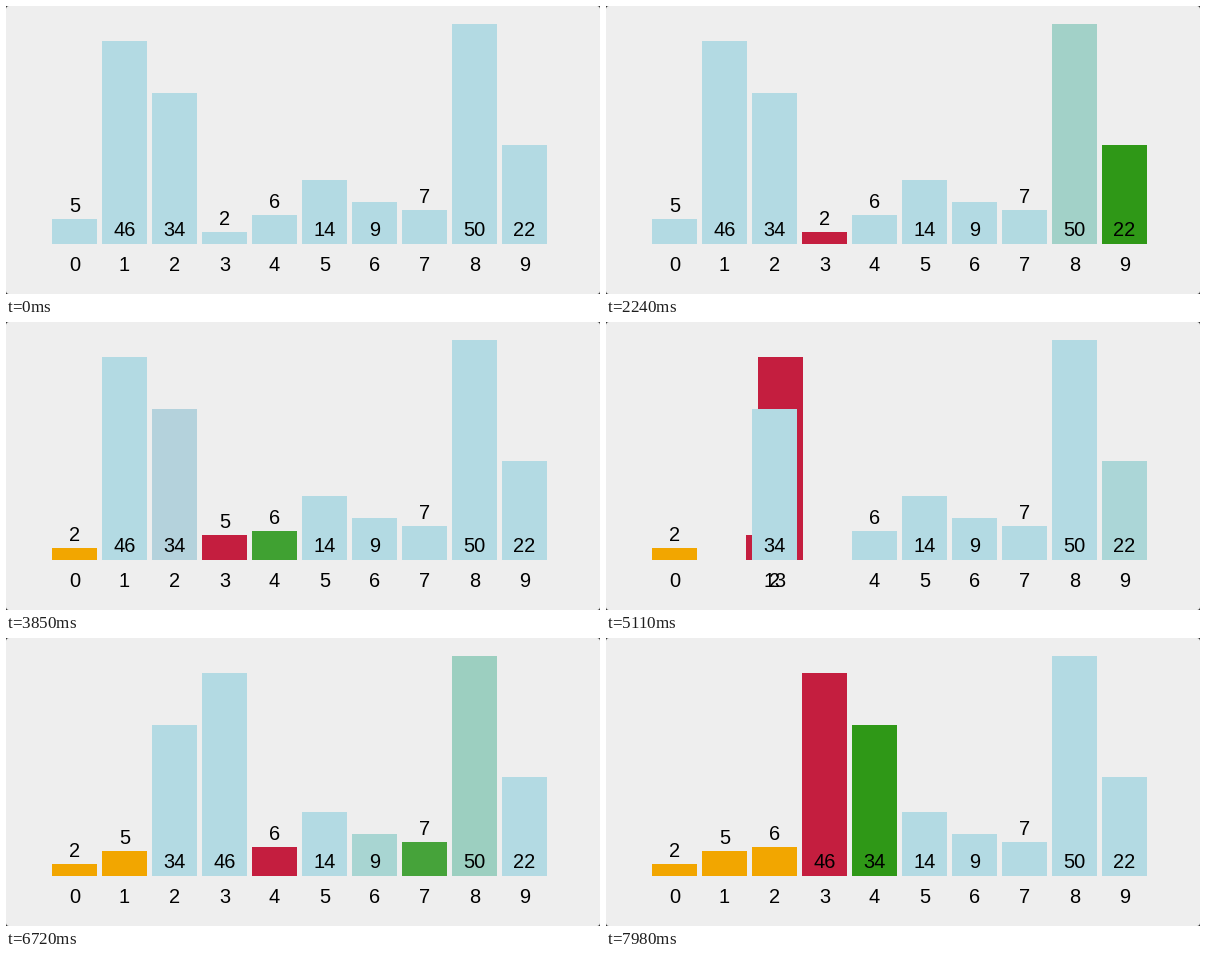
Animation of 594x288 px, one loop 8 s. Source, as a matplotlib script:

```python
import math

import matplotlib.pyplot as plt
import numpy as np
from matplotlib.animation import FuncAnimation
from matplotlib.colors import to_rgb
from matplotlib.patches import FancyBboxPatch, Rectangle

WIDTH, HEIGHT, DPI = 594, 288, 72
LOOP_MS, INTERVAL = 8000, 20
HOLD_MS, TICK_MS = 280, 70

VALUES = [5, 46, 34, 2, 6, 14, 9, 7, 50, 22]
BAR_W, PITCH, LEFT, BASE = 45, 50, 46, 238
BLUE, RED, GREEN, ORANGE = map(to_rgb, ("#b3dae3", "#c41e3f", "#2f9817", "#f2a600"))

# Pace of the sort: milliseconds against steps taken
PACE_MS = [280, 1540, 2940, 3850, 5110, 6720, 7980]
PACE_STEP = [0.45, 7.25, 14.63, 19.68, 26.52, 35.35, 42.05]


def selection_sort(values):
    """Return one (colours, slots) pair per step, both indexed by bar."""
    n = len(values)
    order = list(range(n))
    done, steps = set(), []

    def record(red=(), green=None):
        colours, slots = [BLUE] * n, [0] * n
        for slot, bar in enumerate(order):
            slots[bar] = slot
            if slot in done:
                colours[bar] = ORANGE
            elif slot in red:
                colours[bar] = RED
            elif slot == green:
                colours[bar] = GREEN
        steps.append((colours, slots))

    record()
    for i in range(n):
        low = i
        record(red=[low])
        for j in range(i + 1, n):
            record(red=[low], green=j)
            if values[order[j]] < values[order[low]]:
                low = j
                record(red=[low])
        if low != i:
            record(red=[i, low])
            order[i], order[low] = order[low], order[i]
            record(red=[i, low])
        done.add(i)
        record()
    return steps


STEPS = selection_sort(VALUES)


def ease(u):
    u = min(max(u, 0), 1)
    return 4 * u**3 if u < 0.5 else 1 - 4 * (1 - u) ** 3


def bar_colour(bar, step, phase):
    """Blend from the last colour change; fades to blue leave a faint trail."""
    k = step
    while k > 0 and STEPS[k][0][bar] == STEPS[k - 1][0][bar]:
        k -= 1
    new = STEPS[k][0][bar]
    if k == 0:
        return new
    age = step - k + phase
    rest = 1 - ease(age)
    if new == BLUE:
        rest = max(rest, 0.25 * (1 - age / 2))
    old = STEPS[k - 1][0][bar]
    return tuple(rest * a + (1 - rest) * b for a, b in zip(old, new))


def bar_height(value):
    return (13 * value + 10) / 3


fig = plt.figure(figsize=(WIDTH / DPI, HEIGHT / DPI), dpi=DPI, facecolor="#333333")
ax = fig.add_axes([0, 0, 1, 1])
ax.set(xlim=(0, WIDTH), ylim=(HEIGHT, 0))
ax.axis("off")
ax.add_patch(FancyBboxPatch((0, 0), WIDTH, HEIGHT, facecolor="#eeeeee", linewidth=0,
                            boxstyle="round,pad=0,rounding_size=3", zorder=0))


def add_text(y, string, zorder):
    return ax.text(0, y, string, fontsize=20, family="Liberation Sans", color="black",
                   ha="center", va="baseline", zorder=zorder)


bars, numbers, labels = [], [], []
for i, value in enumerate(VALUES):
    h = bar_height(value)
    bars.append(ax.add_patch(Rectangle((0, BASE - h), BAR_W, h, linewidth=0, zorder=i + 1)))
    numbers.append(add_text(230 if h > 40 else BASE - h - 7, str(value), i + 1.5))
    labels.append(add_text(265, "", 20))


def update(frame):
    tick = math.floor((frame * INTERVAL + INTERVAL / 2 - HOLD_MS) / TICK_MS)
    step, phase = 0, 0
    if tick >= 0:
        pos = float(np.interp(HOLD_MS + tick * TICK_MS, PACE_MS, PACE_STEP))
        step, phase = int(pos) + 1, pos % 1
    slots = STEPS[step][1]
    before = STEPS[max(step - 1, 0)][1]
    for i, bar in enumerate(bars):
        x = LEFT + PITCH * (before[i] + (slots[i] - before[i]) * ease(phase))
        bar.set_x(x)
        bar.set_facecolor(bar_colour(i, step, phase))
        numbers[i].set_x(x + BAR_W / 2)
        labels[i].set_x(x + BAR_W / 2)
        labels[i].set_text(str(slots[i]))
    return bars + numbers + labels


anim = FuncAnimation(fig, update, frames=LOOP_MS // INTERVAL, interval=INTERVAL,
                     repeat=True, repeat_delay=0)
plt.show()
```
